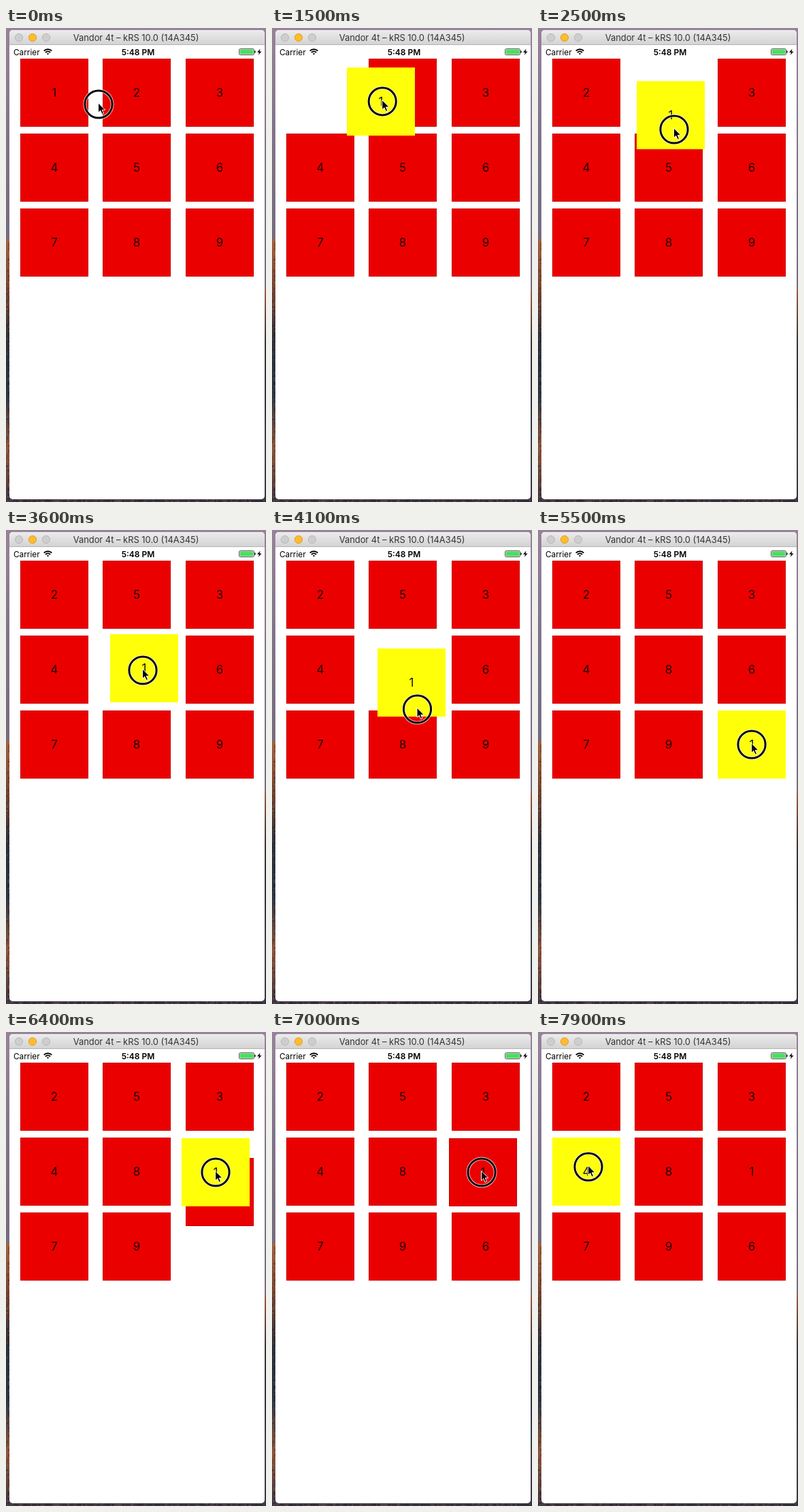
An HTML page with a canvas that plays this animation: 382 px wide and 696 px high, repeating every 8 s.

```html
<!DOCTYPE html>
<html lang="en">
<head>
<meta charset="utf-8">
<title>Tile reordering</title>
<style>
  html, body { margin: 0; width: 100%; height: 100%; overflow: hidden; background: #fff; }
  canvas { display: block; width: 382px; height: 696px; }
</style>
</head>
<body>
<canvas id="stage"></canvas>
<script>
const W = 382, H = 696, LOOP = 8000, STEP = 100;
const FONT = 'Inter, Roboto, sans-serif';
const RED = '#eb0000', YELLOW = '#ffff0a', SIZE = 100;
const LIFT = 1000, FOLLOW = 1100, DROP = 6900, SECOND_LIFT = 7800;
const LAG = 100, SHIFT_MS = 290, SETTLE_MS = 250;
const canvas = document.getElementById('stage');
const ratio = window.devicePixelRatio || 1;
canvas.width = W * ratio;
canvas.height = H * ratio;
const ctx = canvas.getContext('2d');

// Eased strokes of the hand; the pointer rests between them
const home = [136, 112];
const strokes = [
  { start: 0, end: 500, to: [73, 98] },
  { start: 1100, end: 1400, to: [160, 108] },
  { start: 1400, end: 2000, to: [190, 105] },
  { start: 2200, end: 2800, to: [210, 193] },
  { start: 3300, end: 3600, to: [201, 206] },
  { start: 3900, end: 4300, to: [226, 320] },
  { start: 4300, end: 4700, to: [239, 327] },
  { start: 4800, end: 5200, to: [314, 315] },
  { start: 5800, end: 6300, to: [308, 206] },
  { start: 7000, end: 7500, to: [74, 198] }
];

// Tiles that give way to the dragged one
const shifts = [
  { label: 2, from: 1, to: 0, start: 1700 },
  { label: 5, from: 4, to: 1, start: 2700 },
  { label: 8, from: 7, to: 4, start: 4200 },
  { label: 9, from: 8, to: 7, start: 5100 },
  { label: 6, from: 5, to: 8, start: 6300 }
];

function ease(t, start, length) {
  const k = Math.max(0, Math.min(1, (t - start) / length));
  return k * k * (3 - 2 * k);
}

const mix = (a, b, k) => a.map((v, i) => v + (b[i] - v) * k);
const slot = i => [21 + Math.floor((i % 3) * 121.5), 45 + Math.floor(i / 3) * 110];

function pointerAt(t) {
  return strokes.reduce((p, s) => mix(p, s.to, ease(t, s.start, s.end - s.start)), home);
}

function draggedAt(t) {
  const under = pointerAt(Math.min(t, DROP) - LAG).map(v => v - SIZE / 2);
  const held = mix(slot(0), under, ease(t, FOLLOW, SETTLE_MS));
  return mix(held, slot(5), ease(t, DROP, SETTLE_MS));
}

function seeded(seed) {
  return () => (seed = (seed * 16807) % 2147483647) / 2147483647;
}

function text(str, x, y, size, color, align = 'center', weight = 400) {
  ctx.font = `${weight} ${size}px ${FONT}`;
  ctx.fillStyle = color;
  ctx.textAlign = align;
  ctx.fillText(str, x, y);
}

function box(x, y, w, h, r, fill) {
  ctx.beginPath();
  ctx.roundRect(x, y, w, h, r);
  ctx.fillStyle = fill;
  ctx.fill();
}

// Vertical gradient with evenly spaced colours
function ramp(y0, y1, ...colors) {
  const g = ctx.createLinearGradient(0, y0, 0, y1);
  colors.forEach((c, i) => g.addColorStop(i / (colors.length - 1), c));
  return g;
}

function disc(x, fill, edge) {
  ctx.beginPath();
  ctx.arc(x, 14, 5.6, 0, Math.PI * 2);
  ctx.fillStyle = fill;
  ctx.fill();
  ctx.strokeStyle = edge;
  ctx.lineWidth = 1;
  ctx.stroke();
}

function poly(points, fill) {
  ctx.beginPath();
  points.forEach(p => ctx.lineTo(...p));
  ctx.closePath();
  ctx.fillStyle = fill;
  ctx.fill();
}

function landscape(x, w, horizon, ...rocks) {
  ctx.fillStyle = ramp(0, horizon, '#98829a', '#80748a', '#756c7f');
  ctx.fillRect(x, 0, w, horizon);
  ctx.fillStyle = ramp(horizon, H, ...rocks);
  ctx.fillRect(x, horizon, w, H - horizon);
}

function drawDesktop() {
  landscape(0, 190, 310, '#a5623f', '#754431', '#2b303b', '#303845', '#90563c', '#3c3440');
  landscape(190, 192, 385, '#9a5d42', '#3c3438', '#2f333e', '#39404b', '#3c3440');
  const random = seeded(7);
  const speckle = (x, y) => {
    ctx.fillStyle = random() < 0.6 ? 'rgba(20,22,32,.35)' : 'rgba(170,130,110,.25)';
    ctx.fillRect(x, y, 1 + random() * 2, 1 + random() * 3);
  };
  for (let y = 312; y < H; y += 3) speckle(random() * 5, y);
  for (let x = 0; x < W; x += 3) speckle(x, 692 + random() * 3);
}

function drawWindow() {
  box(5, 3, 375, 689, 5, '#fff');
  box(5, 3, 375, 22, [5, 5, 0, 0], ramp(3, 25, '#ececec', '#d2d2d2'));
  ctx.fillStyle = '#b5b3b5';
  ctx.fillRect(5, 24, 375, 1);
  disc(19, '#cfcdcf', '#b9b7b9');
  disc(39, '#fdbc2e', '#dfa023');
  disc(59, '#cfcdcf', '#b9b7b9');
  text('Vandor 4t – kRS 10.0 (14A345)', 191, 19, 12.9, '#333');
}

function drawStatus() {
  text('Carrier', 11, 39.5, 11.8, '#000', 'left');
  text('5:48 PM', 194, 39.5, 12, '#000', 'center', 600);

  ctx.strokeStyle = '#000';
  ctx.lineWidth = 1.9;
  for (const r of [1.5, 5, 8.2]) {
    ctx.beginPath();
    ctx.arc(61.5, 39.5, r, -Math.PI * 0.75, -Math.PI * 0.25);
    ctx.stroke();
  }

  ctx.beginPath();
  ctx.roundRect(342.5, 30.5, 22, 9, 1.8);
  ctx.strokeStyle = '#333';
  ctx.lineWidth = 0.8;
  ctx.stroke();
  box(343.5, 31.5, 20, 7, 0.8, '#4cdc62');
  box(365.2, 33.3, 1.5, 3.5, [0, 1, 1, 0], '#222');
  poly([[373.5, 30.5], [369, 35.8], [372, 35.8], [370.7, 39.8], [375.5, 34.4], [372.5, 34.4]], '#000');
}

function drawTile(label, place, color) {
  const [x, y] = place.map(Math.round);
  ctx.fillStyle = color;
  ctx.fillRect(x, y, SIZE, SIZE);
  if (color === RED) {
    ctx.strokeStyle = 'rgba(90,0,0,.25)';
    ctx.lineWidth = 1;
    ctx.strokeRect(x + 0.5, y + 0.5, SIZE - 1, SIZE - 1);
  }
  text(label, x + 50, y + 56.3, 17, color === RED ? '#1c0000' : '#111');
}

function drawPointer([x, y]) {
  ctx.beginPath();
  ctx.arc(x, y, 20.1, 0, Math.PI * 2);
  ctx.strokeStyle = 'rgba(255,255,255,.75)';
  ctx.lineWidth = 4.8;
  ctx.stroke();
  ctx.strokeStyle = '#08080c';
  ctx.lineWidth = 3;
  ctx.stroke();

  const arrow = [[0, 0], [0, 14.2], [3.2, 11.2], [5.6, 16.6], [8, 15.5], [5.7, 10.4], [10.2, 10.2]];
  poly(arrow.map(([a, b]) => [x + a - 0.5, y + b - 2]), '#000');
  ctx.strokeStyle = '#fff';
  ctx.lineWidth = 1;
  ctx.lineJoin = 'round';
  ctx.stroke();
}

function draw(t) {
  ctx.setTransform(ratio, 0, 0, ratio, 0, 0);
  drawDesktop();
  drawWindow();
  drawStatus();
  drawTile(3, slot(2), RED);
  drawTile(4, slot(3), t >= SECOND_LIFT ? YELLOW : RED);
  drawTile(7, slot(6), RED);
  for (const s of shifts) {
    drawTile(s.label, mix(slot(s.from), slot(s.to), ease(t, s.start, SHIFT_MS)), RED);
  }
  drawTile(1, draggedAt(t), t >= LIFT && t < DROP ? YELLOW : RED);
  drawPointer(pointerAt(t));
}

const begin = performance.now();
function tick() {
  const t = (performance.now() - begin) % LOOP;
  draw(Math.floor(t / STEP) * STEP);
  requestAnimationFrame(tick);
}
tick();
</script>
</body>
</html>
```
